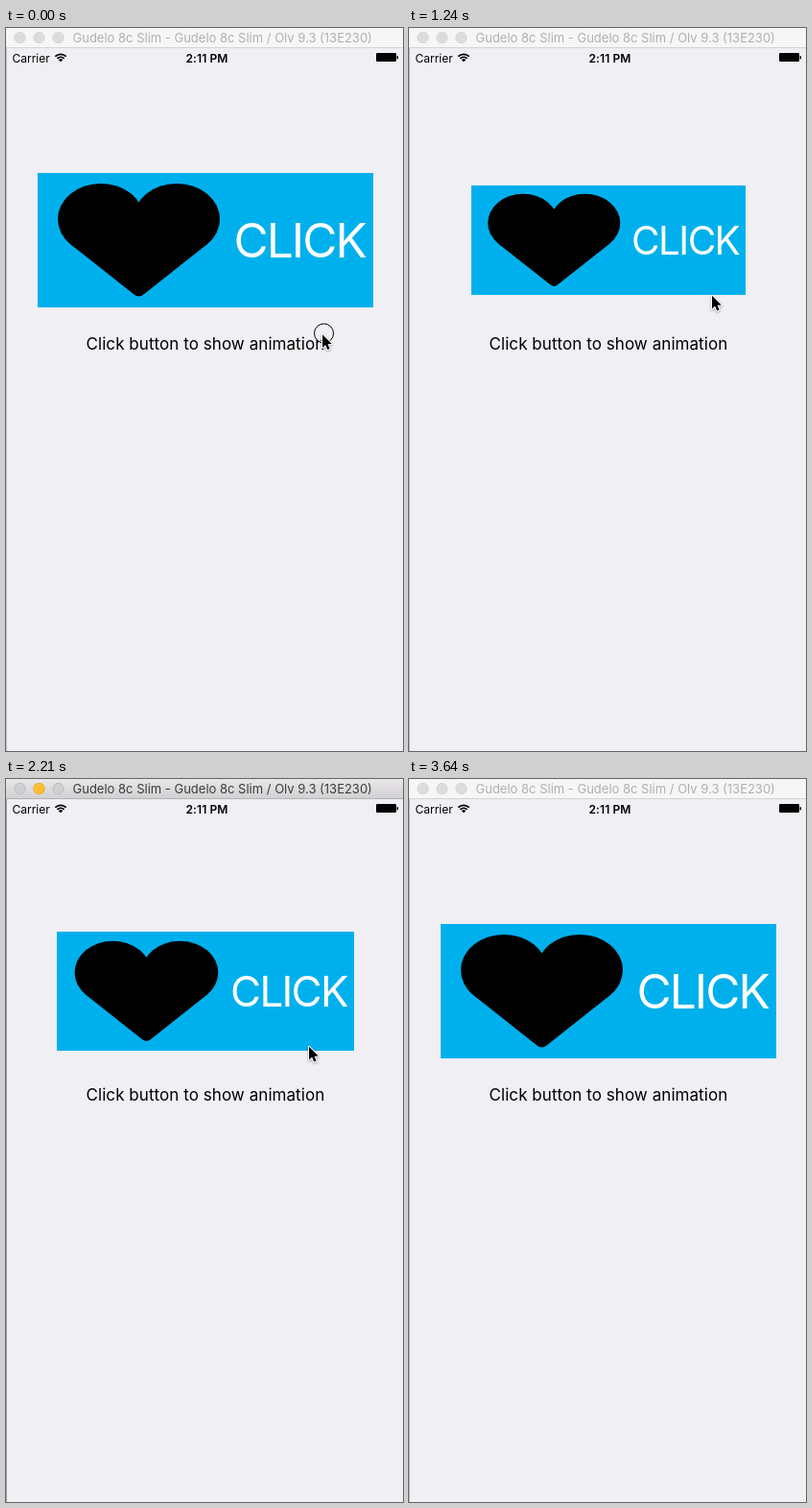
An HTML page with a canvas for the animation above (3.74 s loop, 414 by 753 pixels).

```html
<!DOCTYPE html>
<html lang="en">
<head>
<meta charset="utf-8">
<title>Button pulse</title>
<style>
  html, body { margin: 0; width: 100%; height: 100%; overflow: hidden; background: #efeff4; }
  canvas { display: block; width: 414px; height: 753px; }
</style>
</head>
<body>
<canvas id="stage"></canvas>
<script>
const W = 414, H = 753, LOOP = 3740;
const canvas = document.getElementById('stage');
const ratio = window.devicePixelRatio || 1;
canvas.width = W * ratio;
canvas.height = H * ratio;
const ctx = canvas.getContext('2d');

const TITLE = 'Gudelo 8c Slim - Gudelo 8c Slim / Olv 9.3 (13E230)';
const REST = [315.5, 277];

// The button shrinks, springs past full size and settles
const PULSE = [0.99, 0.886, 0.805, 0.817, 1.011, 1];
const PULSE_STEP = 86;
const PULSE_STARTS = [980, 2120];

const within = (t, from, to) => t >= from && t < to;

function text(str, x, y, size, { weight = 400, color = '#000', align = 'left', spacing = 0 } = {}) {
  ctx.font = `${weight} ${size}px Inter, sans-serif`;
  ctx.letterSpacing = spacing + 'px';
  ctx.textAlign = align;
  ctx.fillStyle = color;
  ctx.fillText(str, x, y);
}

function rect(x, y, w, h, color) {
  ctx.fillStyle = color;
  ctx.fillRect(x, y, w, h);
}

function disc(x, y, r, color) {
  ctx.beginPath();
  ctx.arc(x, y, r, 0, Math.PI * 2);
  ctx.fillStyle = color;
  ctx.fill();
}

function circle(x, y, r, width, color) {
  ctx.beginPath();
  ctx.arc(x, y, r, 0, Math.PI * 2);
  ctx.lineWidth = width;
  ctx.strokeStyle = color;
  ctx.stroke();
}

function drawWindow(active) {
  rect(0, 0, W, H, '#efeff4');
  rect(0, 0, 1, H, active ? '#a2a2a5' : '#c3c3c7');
  let bar = '#f6f6f6';
  if (active) {
    bar = ctx.createLinearGradient(0, 0, 0, 20);
    bar.addColorStop(0, '#e9e7e9');
    bar.addColorStop(1, '#d2d0d2');
  }
  rect(0, 0, W, 20, bar);
  rect(0, 20, W, 1, active ? '#b3b1b3' : '#d3d3d3');
  for (let i = 0; i < 3; i++) {
    const x = 14.5 + 20 * i;
    const lit = active && i === 1;
    disc(x, 10, 6, lit ? '#fcbe30' : active ? '#d0ced0' : '#dcdcdc');
    circle(x, 10, 5.7, 0.6, lit ? '#dfa023' : active ? '#b4b2b4' : '#d2d2d2');
  }
  text(TITLE, 69.5, 15, 13, { color: active ? '#3c3c3c' : '#b0b0b0' });
}

function drawStatus() {
  text('Carrier', 6.5, 35.7, 12);
  text('2:11 PM', 209.5, 35.7, 12, { weight: 600, align: 'center', spacing: 0.1 });

  const from = -Math.PI * 0.75, to = -Math.PI * 0.25;
  ctx.strokeStyle = ctx.fillStyle = '#000';
  ctx.lineWidth = 1.8;
  for (const r of [8, 5]) {
    ctx.beginPath();
    ctx.arc(57, 35.3, r, from, to);
    ctx.stroke();
  }
  ctx.beginPath();
  ctx.moveTo(57, 35.3);
  ctx.arc(57, 35.3, 3, from, to);
  ctx.fill();

  ctx.beginPath();
  ctx.roundRect(386, 26, 21, 9, 1.2);
  ctx.roundRect(407.6, 29, 1.4, 3.5, 0.7);
  ctx.fill();
}

function drawHeart() {
  const mid = 138.5, cy = 199, rx = 45, ry = 37;
  ctx.fillStyle = '#000';
  for (const cx of [mid - 39.5, mid + 39.5]) {
    ctx.beginPath();
    ctx.ellipse(cx, cy, rx, ry, 0, 0, Math.PI * 2);
    ctx.fill();
  }
  ctx.beginPath();
  ctx.moveTo(mid, 181);
  ctx.lineTo(mid - 39.5, 185);
  ctx.lineTo(mid - 70.5, 225.8);
  ctx.lineTo(mid - 6, 276.8);
  ctx.quadraticCurveTo(mid, 282.4, mid + 6, 276.8);
  ctx.lineTo(mid + 70.5, 225.8);
  ctx.lineTo(mid + 39.5, 185);
  ctx.fill();
}

function drawButton(scale) {
  const cx = 208, cy = 221;
  // The panel's edges sit on whole pixels
  const halfW = Math.round(175 * scale), halfH = Math.round(70 * scale);
  rect(cx - halfW, cy - halfH, halfW * 2, halfH * 2, '#00b0ec');
  ctx.save();
  ctx.translate(cx, cy);
  ctx.scale(scale, scale);
  ctx.translate(-cx, -cy);
  drawHeart();
  text('CLICK', 237.4, 239.2, 49.5, { color: '#fff', spacing: -1.9 });
  ctx.restore();
}

function drawPointer([x, y], pressed) {
  if (pressed) {
    circle(x + 2, y + 0.5, 9, 1.2, '#fff');
    circle(x + 2, y + 0.5, 10, 1, '#000');
  }
  ctx.save();
  ctx.translate(x + 0.5, y + 1.8);
  ctx.beginPath();
  ctx.moveTo(0, 0);
  ctx.lineTo(0, 13.6);
  ctx.lineTo(3.1, 10.7);
  ctx.lineTo(5.3, 15.7);
  ctx.lineTo(7.6, 14.7);
  ctx.lineTo(5.5, 9.9);
  ctx.lineTo(9.7, 9.8);
  ctx.closePath();
  ctx.lineWidth = 2;
  ctx.lineJoin = 'round';
  ctx.strokeStyle = '#fff';
  ctx.shadowColor = 'rgba(0,0,0,0.35)';
  ctx.shadowBlur = 2.5 * ratio;
  ctx.shadowOffsetY = ratio;
  ctx.stroke();
  ctx.shadowColor = 'transparent';
  ctx.fillStyle = '#000';
  ctx.fill();
  ctx.restore();
}

function buttonScale(t) {
  for (const start of PULSE_STARTS) {
    const step = Math.floor((t - start + 4) / PULSE_STEP);
    if (t >= start && step < PULSE.length) return PULSE[step];
  }
  return 1;
}

function pointerAt(t) {
  if (t >= 2830) return null;
  if (t >= 2740) return [357, 288.5];
  const start = [329.5, 317.5];
  const step = t < 90 ? 0 : t < 180 ? 0.05 : t < 270 ? 0.4 : t < 350 ? 0.8 : 1;
  return start.map((v, i) => v + (REST[i] - v) * step);
}

function draw(t) {
  ctx.setTransform(ratio, 0, 0, ratio, 0, 0);
  drawWindow(within(t, 2040, 3640));
  drawStatus();
  drawButton(buttonScale(t));
  text('Click button to show animation', 207.9, 335, 17, { align: 'center', spacing: 0.06 });
  const pointer = pointerAt(t);
  const pressed = t < 90 || within(t, 710, 980) || within(t, 2040, 2120);
  if (pointer) drawPointer(pointer, pressed);
}

const begin = performance.now();
function tick() {
  draw((performance.now() - begin) % LOOP);
  requestAnimationFrame(tick);
}
tick();
</script>
</body>
</html>
```
